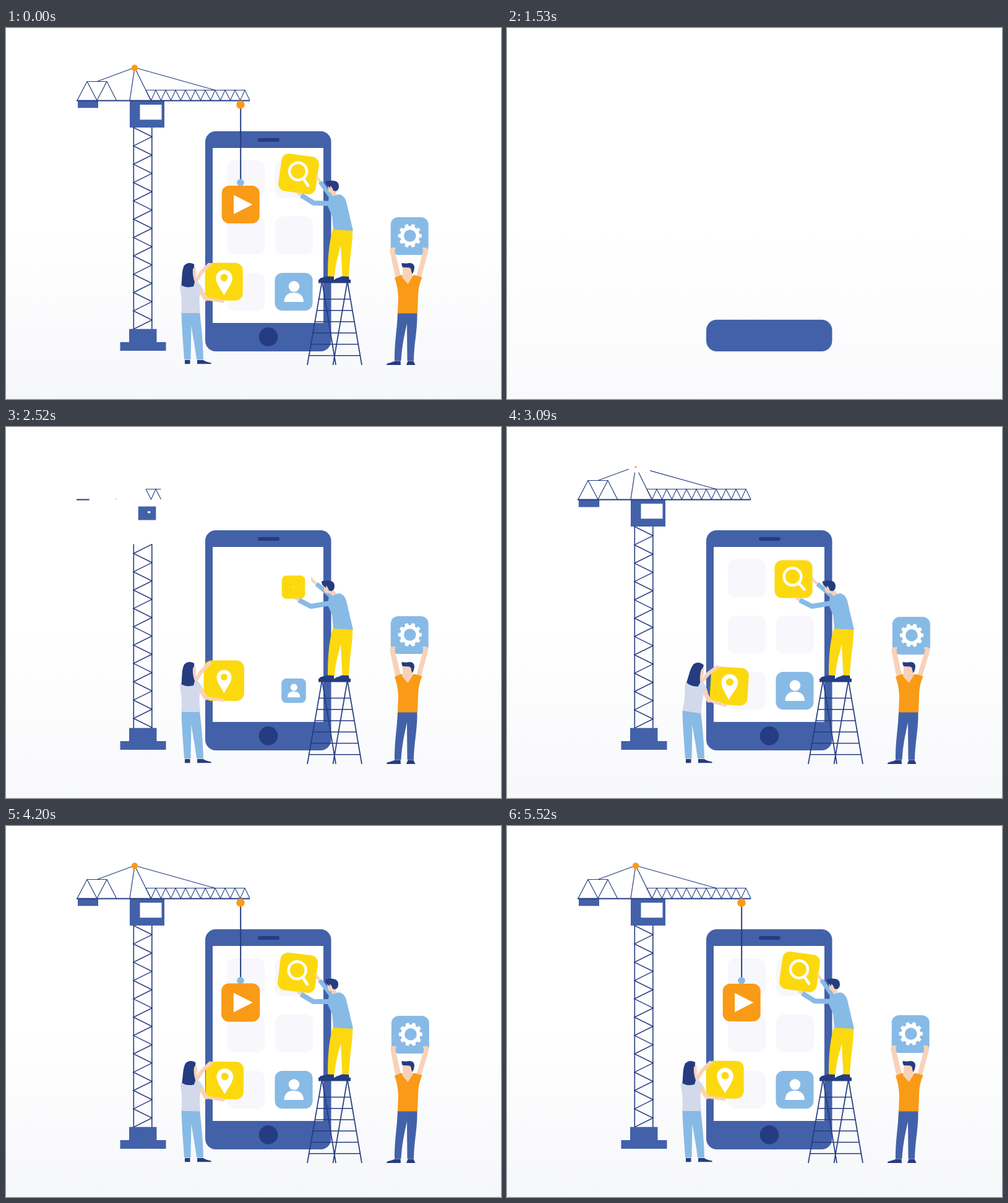
An HTML page with a canvas for the animation above (5550 ms loop, 800x600 px).

```html
<!DOCTYPE html>
<html lang="en">
<head>
<meta charset="utf-8">
<title>App construction</title>
<style>
html, body { margin: 0; width: 100%; height: 100%; overflow: hidden; background: #fff; }
canvas { display: block; }
</style>
</head>
<body>
<canvas id="stage" width="800" height="600"></canvas>
<script>
const c = document.getElementById('stage').getContext('2d');
const LOOP = 5550, CUT = 1230, REST = 5520;
const BLUE = '#4361a9', DARK = '#253c80', ORANGE = '#f99b16', YELLOW = '#fcd90f',
      SKY = '#88bae6', PALE = '#d2d9ea', SKIN = '#f8d2b8', SLOT = '#f7f7fc', WHITE = '#fff';
const RAD = Math.PI / 180;

let T = 0;
const clamp = p => Math.max(0, Math.min(1, p));
const lerp = (a, b, p) => a + (b - a) * p;
const mix = (a, b, p) => [lerp(a[0], b[0], p), lerp(a[1], b[1], p)];
const prog = (start, dur) => clamp((T - start) / dur);
const quad = p => p < .5 ? 2 * p * p : 1 - 2 * (1 - p) ** 2;
const cubic = p => p < .5 ? 4 * p ** 3 : 1 - 4 * (1 - p) ** 3;
const ease = (start, dur) => quad(prog(start, dur));
const wave = start => (1 - Math.cos(Math.PI * (T - start) / 750)) / 2;

// grows past full size, then settles
function pop(start, dur = 500) {
  const p = prog(start, dur);
  return p < .6 ? 1.08 * quad(p / .6) : 1.08 - .08 * quad((p - .6) / .4);
}

function at(x, y, scale, turn, draw) {
  if (scale <= 0) return;
  c.save();
  c.translate(x, y);
  c.rotate(turn);
  c.scale(scale, scale);
  draw();
  c.restore();
}
const grow = (x, y, scale, draw) => at(x, y, scale, 0, () => { c.translate(-x, -y); draw(); });
const spin = (x, y, turn, draw) => at(x, y, 1, turn, () => { c.translate(-x, -y); draw(); });

function box(x, y, w, h, color, r = 0) {
  c.fillStyle = color;
  c.beginPath();
  c.roundRect(x, y, w, h, Math.min(r, w / 2, h / 2));
  c.fill();
}
function dot(x, y, r, color, ry = r, turn = 0) {
  c.fillStyle = color;
  c.beginPath();
  c.ellipse(x, y, r, ry, turn, 0, 7);
  c.fill();
}
function shape(d, color) {
  c.fillStyle = color;
  c.fill(new Path2D(d));
}
function trace(points) {
  c.beginPath();
  points.forEach(([x, y]) => c.lineTo(x, y));
}
function line(points, width, color = DARK, cap = 'butt') {
  c.lineWidth = width;
  c.strokeStyle = color;
  c.lineCap = cap;
  c.lineJoin = cap === 'round' ? 'round' : 'miter';
  trace(points);
  c.stroke();
}
// the first part of a polyline
function partial(points, p, width) {
  if (p <= 0) return;
  const size = i => Math.hypot(points[i][0] - points[i - 1][0], points[i][1] - points[i - 1][1]);
  let left = 0;
  for (let i = 1; i < points.length; i++) left += size(i) * p;
  const out = [points[0]];
  for (let i = 1; i < points.length && left > 0; i++) {
    out.push(mix(points[i - 1], points[i], Math.min(1, left / size(i))));
    left -= size(i);
  }
  line(out, width);
}
const tile = color => box(-30.5, -30.5, 61, 61, color, 12);

function ground() {
  const g = c.createLinearGradient(0, 330, 0, 600);
  g.addColorStop(0, 'rgba(246,247,250,0)');
  g.addColorStop(1, 'rgba(246,247,250,1)');
  c.globalAlpha = .6 + .4 * prog(1700, 2000);
  c.fillStyle = g;
  c.fillRect(0, 330, 800, 270);
  c.globalAlpha = 1;
}

function phone() {
  const h = 356 * cubic(prog(1300, 700));
  if (h > 0) box(322, 523 - h, 203.5, h, BLUE, 17);
  const s = 283 * cubic(prog(1730, 700));
  if (s > 0) box(334, 477 - s, 179, s, WHITE);
  grow(424.5, 181, pop(2090, 400), () => box(407, 178, 35, 6, DARK, 3));
  grow(424, 499.5, pop(2090, 400), () => dot(424, 499.5, 15.3, DARK));
  c.globalAlpha = ease(2750, 500);
  for (const x of [357, 435])
    for (const y of [214, 305, 396]) box(x, y, 61, 61, SLOT, 12);
  c.globalAlpha = 1;
  at(465, 426.5, pop(2355), 0, () => {
    tile(SKY);
    dot(.5, -8.5, 8.7, WHITE);
    shape('M-15.5 16.5 C-15.5 6 -9 1.5 0 1.5 C9 1.5 16 6 16 16.5 Z', WHITE);
  });
}

function crane() {
  const drop = 341 * (1 - ease(2080, 590));
  if (drop < 341) {
    c.save();
    c.beginPath();
    c.rect(190, 118, 60, 369);
    c.clip();
    const zig = [];
    for (let i = 0; i < 25; i++) zig.push([i % 2 ? 206 : 236, 146.2 + 14.82 * i + drop]);
    line(zig, 1.5);
    line([[206.3, 146 + drop], [206.3, 520]], 1.6);
    line([[235.8, 146 + drop], [235.8, 520]], 1.6);
    c.restore();
  }
  grow(221.5, 522, pop(1700), () => box(184.5, 508, 74, 14, BLUE));
  grow(221.5, 508, pop(1800), () => box(199, 486.7, 44.5, 22, BLUE));

  grow(228, 139.5, pop(2375), () => {
    box(200, 118, 56, 43, BLUE);
    grow(234, 136, pop(2420), () => box(216.5, 124, 35, 24.3, WHITE));
  });
  grow(132, 117, pop(2650), () => box(116, 117, 33, 12.3, BLUE));

  const jib = [[226, 100.5]];
  for (let i = 0; i < 10; i++) jib.push([234.5 + 16 * i, 117], [242 + 16 * i, 100.5]);
  jib.push([394, 117]);
  const p = ease(2395, 470);
  if (p > 0) {
    c.save();
    c.beginPath();
    c.rect(225, 98, 1 + 170 * p, 22);
    c.clip();
    line(jib, 1.1);
    line([[226, 100.5], [386, 100.5]], 1.2);
    c.restore();
  }
  partial([[178.5, 117], [163, 86.5], [131, 86.5], [115, 117]], ease(2490, 480), 1.2);
  partial([[163, 86.5], [147, 117], [131, 86.5]], ease(2640, 350), 1.2);
  partial([[114, 117.5], [394, 117.5]], ease(2425, 500), 2);

  const up = ease(2860, 330);
  partial([[234, 117], [208, 64]], up, 1.2);
  partial([[200, 117], [208, 64]], up, 1.2);
  partial([[147, 86.5], [208, 64]], up, 1.2);
  partial([[338, 100.5], [208, 64]], up, 1.2);
  grow(208, 64.5, pop(2980), () => dot(208, 64.5, 5.2, ORANGE));
}

function hook() {
  const u = clamp((T - 4170) / 1200);
  const turn = 1.15 * RAD * (1 - Math.cos(2 * Math.PI * u)) / 2;
  spin(379, 124, turn, () => {
    const p = ease(3290, 490);
    if (p > 0) line([[379.2, 124], [379.2, 124 + 126 * p]], 2);
    grow(379, 250, pop(3710, 400), () => dot(379, 250, 5.8, SKY));
    at(379.2, 285.5, pop(3770), 0, () => {
      tile(ORANGE);
      shape('M-11.2 -15.5 L19.2 0 L-11.2 15.5 Z', WHITE);
    });
  });
  grow(379, 124, pop(3100), () => dot(379, 124, 6.7, ORANGE));
}

function ladder() {
  grow(531, 545, pop(1800), () => {
    const w = 1.7;
    line([[510.5, 411], [487, 545]], w);
    line([[511, 411], [533, 545]], w);
    line([[551.5, 411], [528.5, 545]], w);
    line([[552, 411], [575, 545]], w);
    for (let i = 0; i < 6; i++) {
      const y = 438.5 + 18.25 * i, d = (y - 411) * .174;
      line([[510.5 - d, y], [552 + d, y]], w);
    }
    box(505, 407, 52, 5.6, DARK);
  });
}

function climber() {
  const m = T < 3270 ? 0 : wave(3270);
  const e = ease(2090, 390);
  const low = mix([515, 315], mix([469, 278], [473, 268], m), e);
  const elbow = mix([521, 300], mix([493, 290], [497, 283], m), e);
  const high = mix([533, 238], mix([495, 248], [503, 242], m), e);
  const head = mix([540, 257], mix([520, 258.5], [527, 257], m), e);

  grow(467, 280, pop(2360), () =>
    at(...mix([463, 246], [473, 236], m), 1, 8 * m * RAD, () => {
      tile(YELLOW);
      const s = pop(2460, 420);
      at(0, 0, s, 0, () => {
        c.lineWidth = 4.4;
        c.strokeStyle = WHITE;
        c.beginPath();
        c.arc(-1.5, -4, 14, 0, 7);
        c.stroke();
        line([[9, 7], [17.5, 16.5]], 4.6, WHITE, 'round');
      });
    }));

  grow(535, 408, pop(1968), () => {
    const shoulder = [526, 274];
    const wrist = mix(shoulder, high, .78);
    line([wrist, high], 4, SKIN, 'round');
    line([high, [high[0] - 1, high[1] - 4]], 2.4, SKIN, 'round');
    line([shoulder, wrist], 7, SKY);
    shape('M528 326 L560 326 C561 345 556 365 554 402 L543.5 402 L541 352 C537 368 532 382 531 402 L520 402 C520 370 522 348 528 326 Z', YELLOW);
    shape('M506 408.5 Q506 404 512 403.5 L519 401.5 L530 402 L530 408.5 Z', DARK);
    shape('M530.5 408.5 Q531 405 537 404 L543 401.5 L554 402 L555 408.5 Z', DARK);
    shape('M522 272 L539 269 Q547 271 550 281 L561 328 L529 326 L527 304 L520 288 Z', SKY);
    line([[head[0] + 2, head[1] + 4], [531, 271]], 7.5, SKIN);
    const cuff = mix(elbow, low, .82);
    line([cuff, low], 4, SKIN, 'round');
    line([low, [low[0] + 4, low[1] + 1]], 4, SKIN, 'round');
    line([[529, 284], elbow, cuff], 8, SKY);
    at(head[0], head[1], 1, 0, () => {
      shape('M-7 -5 L6 -5 L6 5 L3 10 Q-4 11 -6 6 Z', SKIN);
      shape('M-10 -9 Q-3 -11 3 -10 Q11 -9 11 -1 Q11 5 6 7 L2 6 L0 1 L-3 -2 L-3 2 L-6 -1 Q-10 -3 -10 -9 Z', DARK);
    });
  });
}

function woman() {
  const w = wave(2520), e = ease(2090, 390), turn = 10 * w * RAD;
  grow(305, 543, pop(1955), () => {
    box(289.5, 533, 7.5, 6, SKIN);
    box(309.5, 533, 7.5, 6, SKIN);
    box(289, 537, 8.5, 6.3, DARK);
    shape('M309 537 L319 537 Q323 540 330 541 Q332 542 332 543.3 L309 543.3 Z', DARK);
    shape('M283.5 459 L313 459 C316 485 318 505 319 536 L308 536 C305 510 301 495 299.5 481 L298.5 536 L288 536 C286 505 284 485 283.5 459 Z', SKY);
    spin(298, 461, turn, () => {
      const high = mix([346, 432], [328, 383], e);
      const bend = mix([325, 424], [316, 395], e);
      const low = mix([338, 470], [351, 442], e);
      const crook = mix([320, 445], [323, 438], e);
      at(352.2, 410.3, pop(2180), -6 * w * RAD, () => {
        tile(YELLOW);
        at(0, 0, pop(2320), 0, () => {
          shape('M.3 22 C-5 12 -13 3 -13 -6 A13.3 13.3 0 0 1 13.6 -6 C13.6 3 5.5 12 .3 22 Z', WHITE);
          dot(.3, -6.5, 6, YELLOW);
        });
      });
      line([[304, 414], bend, high], 6, SKIN, 'round');
      line([high, [high[0] + 4, high[1] - 1]], 2.4, SKIN, 'round');
      shape('M288 402 L307 400 L306 412 L292 414 Z', SKIN);
      shape('M281 420 Q282 410 290 409 L306 409 Q313 411 320 426 L313 431 Q312 445 314 461 L283.5 461 Q285 440 281 420 Z', PALE);
      line([[315, 426], crook], 7, SKIN, 'round');
      line([crook, low], 4.6, SKIN, 'round');
      spin(296, 410, turn * .5, () => {
        shape('M296 385 L306 387 L307.5 396 L306 402 Q303 405 297 402 Z', SKIN);
        shape('M304 382 Q295 377 288 384 Q285 390 284.5 400 L283.5 416 Q291 421 303 418 L305 411 Q301 400 302 390 Q305 387 304 382 Z', DARK);
      });
    });
  });
}

function gear() {
  c.fillStyle = WHITE;
  c.beginPath();
  for (let i = 0; i < 10; i++)
    for (const [a, r] of [[-.2, 15.3], [-.14, 19.2], [.14, 19.2], [.2, 15.3]]) {
      const q = i * Math.PI / 5 + a;
      c.lineTo(r * Math.cos(q), r * Math.sin(q));
    }
  c.closePath();
  c.fill();
  dot(0, 0, 15.6, WHITE);
  dot(0, 0, 9.8, SKY);
}

function lifter() {
  const s = T < 2520 ? 0 : Math.sin(2 * Math.PI * (T - 2520) / 1500);
  const dx = 1.7 * s, dy = 1.3 * Math.abs(s);
  grow(638, 545, pop(1670), () => {
    at(652.2 + dx, 336.5 + dy, 1, 0, () => {
      tile(SKY);
      at(.6, -.5, pop(1995, 480), 0, gear);
    });
    for (const [x, hx, k] of [[634, 624.5, 1], [667, 678, -1]]) {
      const px = hx + dx, py = 362 + dy;
      shape(`M${x - 4.5} 404 L${px - 4} ${py} L${px + 4} ${py} L${x + 4.5} 402 Z`, SKIN);
      dot(px, py - 2, 4.2, SKIN, 5);
      line([[px, py - 3], [px + 3.5 * k, py - 5.5]], 3.2, SKIN, 'round');
    }
    box(629, 535, 9, 5, SKIN);
    box(649.5, 535, 9, 5, SKIN);
    shape('M615 545 Q614.5 542.5 620 541.5 Q626 540 628.5 538.5 L637.5 538.5 L638 545 Z', DARK);
    shape('M647 545 L649.5 538.5 L658.5 538.5 L661.5 545 Z', DARK);
    shape('M633 460 L664.5 460 C665 490 660 505 659 538 L648.5 538 L648 478 C643 500 640 515 638.5 538 L628 538 C628 505 632 490 633 460 Z', BLUE);
    shape('M628 404 L638.5 399.5 L649 404 L660 399.5 L672.5 403 Q666 418 666 435 L665 461.5 L633 461.5 L634 435 Q633 417 628 404 Z', ORANGE);
    shape('M642 396 L656 396 L657 402.5 L649.5 414 L640 403 Z', SKIN);
    shape('M641 387 L657 387 L657 397 Q655 404 649 404.5 Q642 404 641 396 Z', SKIN);
    shape('M639.5 380 Q647 381.5 652 380 Q660 380 660 388 Q659.5 394 656.5 398 L655 393 Q655 388 651 387.5 L641 387 Q639 384 639.5 380 Z', DARK);
  });
}

function frame(now) {
  const t = now % LOOP;
  T = t < CUT ? REST : Math.min(t, REST);
  c.fillStyle = WHITE;
  c.fillRect(0, 0, 800, 600);
  ground();
  phone();
  crane();
  hook();
  ladder();
  climber();
  woman();
  lifter();
  requestAnimationFrame(frame);
}
requestAnimationFrame(frame);
</script>
</body>
</html>
```
